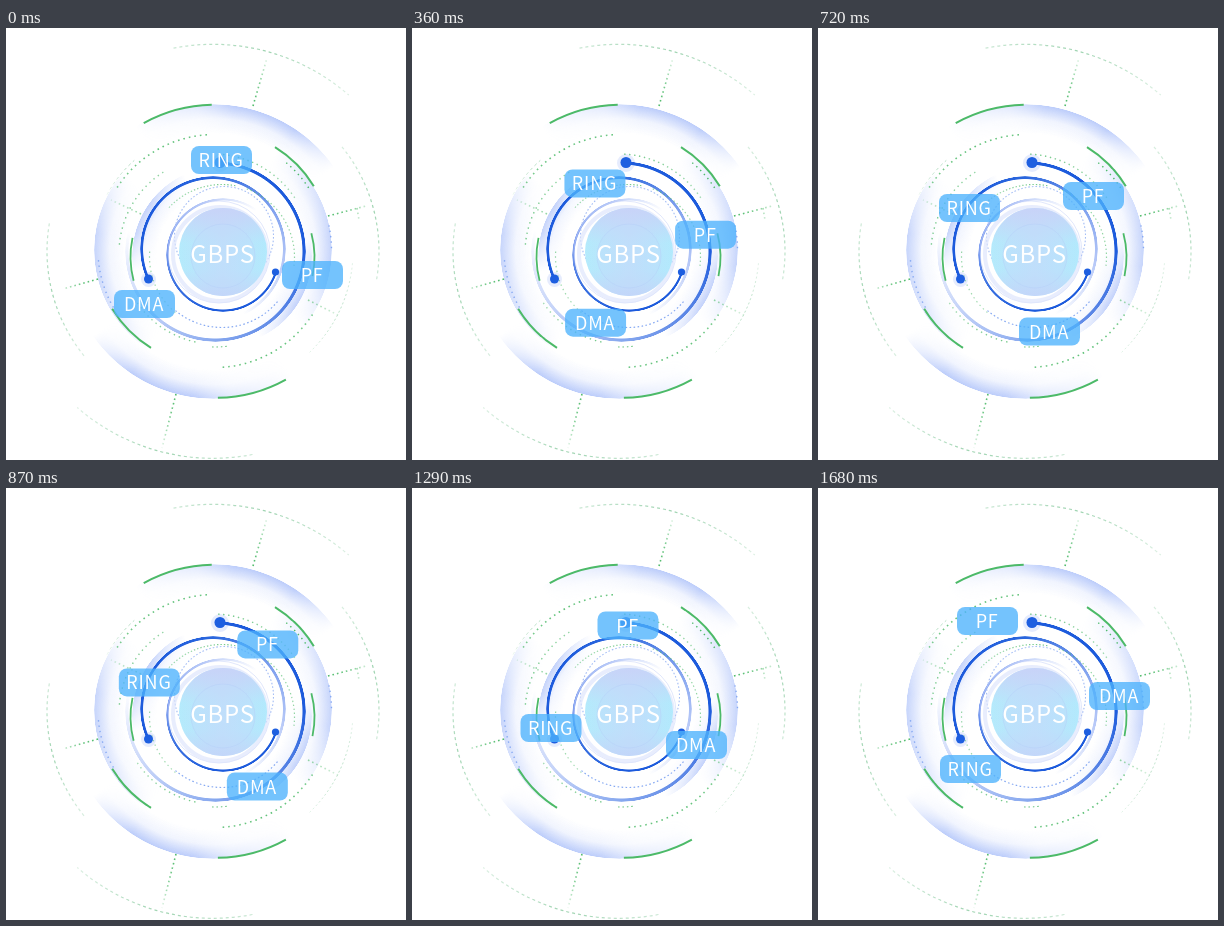
An HTML page that plays this animation: 400 by 432 pixels, repeating every 2670 ms.

```html
<!DOCTYPE html>
<html lang="en">
<head>
<meta charset="utf-8">
<title>Orbit</title>
<style>
html, body { margin: 0; width: 100%; height: 100%; overflow: hidden; background: #fff; }
svg { position: absolute; left: 0; top: 0; width: 400px; height: 432px; }
.ring {
  position: absolute; border-radius: 50%;
  left: calc((var(--x) - var(--r)) * 1px); top: calc((var(--y) - var(--r)) * 1px);
  width: calc(var(--r) * 2px); height: calc(var(--r) * 2px);
  -webkit-mask: var(--m, none); mask: var(--m, none);
}
/* soft bands: colour at the rim, faded along the circle */
.band { background: radial-gradient(closest-side, #b3c6fa00 var(--in), #b3c6fa38 calc(50% + var(--in) / 2), #b3c6fa 99.5%, #b3c6fa00); }
.outer { --x: 207.5; --y: 223.5; --r: 147.5; --in: 80%;
  --m: repeating-conic-gradient(from -32deg, #0000, #0006 26deg, #000d 40deg 66deg, #0005 78deg, #0000 87deg 180deg); }
.side { --x: 207; --y: 222; --r: 119; --in: 74%;
  --m: repeating-conic-gradient(from 33deg, #0000, #0007 25deg, #000b 50deg 65deg, #0005 82deg, #0000 98deg 180deg); }
.inner { --x: 216; --y: 228; --r: 90; --in: 72%;
  --m: repeating-conic-gradient(from 80deg, #0000, #000b 25deg, #000c 45deg, #0000 75deg 180deg); }
.halo { background: #d5e0fb99; }
/* tapering orbit strokes */
.arc { --m: radial-gradient(closest-side, #0000 calc(100% - var(--w) - .5px), #000 calc(100% - var(--w) + .3px) calc(100% - .6px), #0000); }
.one { --x: 209.8; --y: 223.3; --r: 90.6; --w: 3.4px;
  background: conic-gradient(from 3deg, #1d5bdc 85deg, #5a86e6 130deg, #8aaaef 180deg, #c3d2f8 225deg, #e6ecfd 260deg, #e6ecfd00 280deg); }
.two { --x: 207; --y: 220.5; --r: 73; --w: 3px;
  background: conic-gradient(from 245deg, #1d5bdc 60deg, #2a66dd 115deg, #7ea0ee 170deg, #b5c7f7 215deg, #b5c7f700 270deg); }
.three { --x: 217; --y: 226.8; --r: 56.8; --w: 2.4px;
  background: conic-gradient(from 107deg, #1d5bdc 80deg, #3a70e0 130deg, #7d9def 170deg, #b3c6f7 230deg, #b3c6f700 290deg); }
text { fill: #fff; text-anchor: middle; letter-spacing: .8px;
  font: 18px "Noto Sans CJK SC", "Noto Sans CJK JP", "Noto Sans", sans-serif; }
.hub { font-size: 24px; }
.tag rect { fill: #4db2fd; fill-opacity: .78; }
</style>
</head>
<body>
<div class="ring band outer"></div>
<div class="ring band side"></div>
<div class="ring band inner"></div>
<div class="ring halo" style="--x: 214; --y: 134.5; --r: 9"></div>
<div class="ring halo" style="--x: 142.5; --y: 251; --r: 7.5"></div>
<div class="ring arc one"></div>
<div class="ring arc two"></div>
<div class="ring arc three"></div>
<svg viewBox="0 0 400 432">
  <defs>
    <linearGradient id="core" x1="0" x2="1">
      <stop stop-color="#b2edfc"/><stop offset=".5" stop-color="#c0e0fb"/><stop offset="1" stop-color="#b0ecfd"/>
    </linearGradient>
    <linearGradient id="caps" x2="0" y2="1">
      <stop stop-color="#c8d3f8"/><stop offset=".4" stop-color="#c8d3f8" stop-opacity=".1"/>
      <stop offset=".7" stop-color="#c3d5f9" stop-opacity=".1"/><stop offset="1" stop-color="#c3d5f9" stop-opacity=".9"/>
    </linearGradient>
  </defs>
  <g id="lines" fill="none"></g>
  <g fill="none" stroke="#bccaf6">
    <circle cx="213" cy="224" r="51" stroke-opacity=".45"/>
    <circle cx="214" cy="226" r="47" stroke="#dfe6fc" stroke-width="4" stroke-opacity=".7"/>
  </g>
  <circle cx="217" cy="224" r="44" fill="url(#core)"/>
  <circle cx="217" cy="224" r="44" fill="url(#caps)"/>
  <circle cx="217" cy="228" r="32" fill="#bfdcfb" fill-opacity=".4" stroke="#b4cdf7" stroke-opacity=".4"/>
  <g fill="#1e5fe0">
    <circle cx="214" cy="134.5" r="5.5"/>
    <circle cx="142.5" cy="251" r="4.5"/>
    <circle cx="269.5" cy="244" r="3.6"/>
  </g>
  <text class="hub" x="216.5" y="235">GBPS</text>
  <g id="tags"></g>
</svg>
<script>
const NS = 'http://www.w3.org/2000/svg';
const LOOP = 2670, MOVE = 1680, STEP = 30;
const GREEN = '#4cba68', PALE = '#9fd4b1', BLUE = '#86a9f2';
const lines = document.getElementById('lines');

function add(parent, name, attrs, text) {
  const el = document.createElementNS(NS, name);
  for (const key in attrs) el.setAttribute(key, attrs[key]);
  if (text) el.textContent = text;
  return parent.appendChild(el);
}

// degrees clockwise from the top
function polar(cx, cy, r, deg) {
  const a = deg * Math.PI / 180;
  return [cx + r * Math.sin(a), cy - r * Math.cos(a)];
}

let fades = 0;
function fade([x1, y1], [x2, y2], color, alphas) {
  const id = 'fade' + fades++;
  const g = add(lines, 'linearGradient', { id, x1, y1, x2, y2, gradientUnits: 'userSpaceOnUse' });
  alphas.forEach((a, i) => add(g, 'stop', { offset: i / (alphas.length - 1), 'stop-color': color, 'stop-opacity': a }));
  return `url(#${id})`;
}

function arc(cx, cy, r, from, to, color, width, dash, alphas) {
  const a = polar(cx, cy, r, from), b = polar(cx, cy, r, to);
  const stroke = alphas ? fade(a, b, color, alphas) : color;
  add(lines, 'path', {
    d: `M${a}A${r} ${r} 0 ${to - from > 180 ? 1 : 0} 1 ${b}`,
    stroke, 'stroke-width': width, 'stroke-dasharray': dash || 'none'
  });
}

// the same arc on both sides of the centre
function pair(cx, cy, r, from, to, ...style) {
  arc(cx, cy, r, from, to, ...style);
  arc(cx, cy, r, from + 180, to + 180, ...style);
}

function spoke(x1, y1, x2, y2, alphas) {
  add(lines, 'path', {
    d: `M${x1} ${y1}L${x2} ${y2}`, stroke: fade([x1, y1], [x2, y2], GREEN, alphas),
    'stroke-width': 1.6, 'stroke-dasharray': '1.6 3'
  });
}

pair(207, 223.3, 207, -11, 41, PALE, 1.2, '3 3', [.55, 1, .35]);
pair(207, 223.3, 166, 51, 100, PALE, 1.2, '3 3', [.4, 1, .5]);
pair(208.8, 223, 116.5, -57, -2, GREEN, 1.6, '1.6 4', [.7, .9, .8]);
pair(208.8, 223.3, 146.6, -29, -1.2, GREEN, 2);
pair(207, 219.5, 118, 31.7, 58.7, GREEN, 2);
pair(216.5, 229, 92, 75, 102, GREEN, 1.8);
arc(207, 223, 140, 95, 137, PALE, 1, '2 2.5', [.3, .8, .3]);
arc(207, 223, 120, -62, -41, PALE, 1, '3 3', [.2, .9]);
arc(209, 225, 96, 275, 329, GREEN, 1.4, '1.4 4', [.8, .6]);
arc(207, 224, 98, 3, 57, GREEN, 1.4, '1.4 3.6', [.8, .5]);
arc(207, 222, 114, 40, 58, GREEN, 1.4, '1.4 4');
arc(207, 222, 118.5, 78, 91, BLUE, 1.4, '1.4 4');
arc(207, 222, 115, 240, 266, BLUE, 1.4, '1.4 4');
arc(209, 222, 94, 192, 236, GREEN, 1.4, '1.4 4', [.8, .5]);
arc(209, 223, 96, 173, 182, GREEN, 1, '1.4 3');
arc(216, 229, 72.5, 220, 275, GREEN, 1.2, '1.4 3.4', [.5, .6]);
arc(216, 229, 72.5, 313, 372, GREEN, 1.2, '1.4 2', [.5, .8]);
arc(216, 229, 72.5, 20, 98, GREEN, 1.2, '1.4 2.6', [.6, .6]);
arc(216, 227, 72.5, 130, 220, BLUE, 1.2, '1.6 2.4');
arc(218, 208, 49.5, 230, 500, '#a5bef5', 1.1, '1.6 2');

spoke(247, 78, 261, 30, [1, .7, .15]);
spoke(170, 366, 156, 420, [1, .7, .15]);
spoke(322, 188, 360, 178, [1, .8, .3]);
spoke(92, 251, 57, 261, [1, .8, .3]);
spoke(302, 272, 332, 287, [.6, .2]);
spoke(135, 186, 105, 172, [.6, .2]);
spoke(351, 180, 353, 192, [.5, .3]);

// tag centres passed at these times
const TIMES = [0, 210, 510, 720, 1020, 1290, 1680];
const TAGS = [
  ['DMA', [138.5, 164.5, 203, 231.5, 268.5, 284.5, 301.5], [276, 288, 300, 303.5, 289, 257, 208]],
  ['PF', [306.5, 297.5, 289, 275.5, 246.5, 216, 169.5], [247, 224, 189.5, 168, 147, 137.5, 133]],
  ['RING', [215.5, 197.5, 168.5, 151.5, 138, 139, 152.5], [132, 147, 164, 180, 210, 240, 281]]
].map(([name, xs, ys]) => {
  const el = add(document.getElementById('tags'), 'g', { class: 'tag' });
  add(el, 'rect', { x: -30.5, y: -14, width: 61, height: 28, rx: 8 });
  add(el, 'text', { x: -.4, y: 7 }, name);
  return { el, xs, ys };
});

function slope(v, i) {
  const a = Math.max(i - 1, 0), b = Math.min(i + 1, v.length - 1);
  return (v[b] - v[a]) / (TIMES[b] - TIMES[a]);
}

// smooth cubic through the knots
function spline(v, t) {
  let i = 0;
  while (i < TIMES.length - 2 && t >= TIMES[i + 1]) i++;
  const h = TIMES[i + 1] - TIMES[i], u = (t - TIMES[i]) / h, w = 1 - u;
  return v[i] * w * w * (1 + 2 * u) + v[i + 1] * u * u * (3 - 2 * u)
    + h * u * w * (slope(v, i) * w - slope(v, i + 1) * u);
}

function draw() {
  const now = performance.now() % LOOP;
  const t = Math.min(Math.floor(now / STEP) * STEP, MOVE);
  for (const { el, xs, ys } of TAGS)
    el.setAttribute('transform', `translate(${spline(xs, t)} ${spline(ys, t)})`);
  requestAnimationFrame(draw);
}
draw();
</script>
</body>
</html>
```
